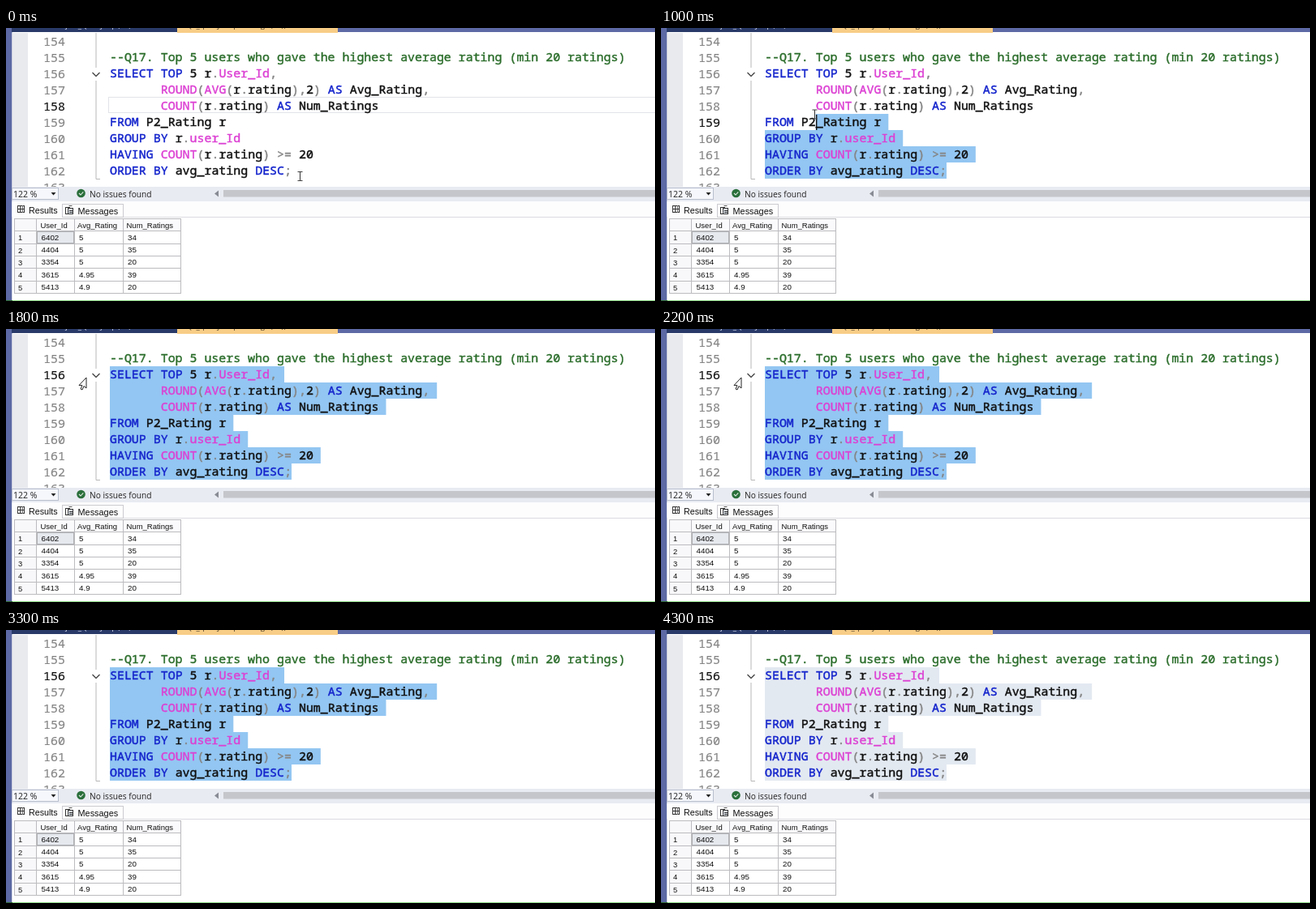
Recreate the animation shown at these times as an HTML page with a canvas. Size 800 by 337 pixels, loop 4.4 s.

```html
<!DOCTYPE html>
<html lang="en">
<head>
<meta charset="utf-8">
<title>SQL query run</title>
<style>
html, body { margin: 0; width: 100%; height: 100%; overflow: hidden; background: #fff; }
canvas { display: block; }
</style>
</head>
<body>
<canvas id="stage" width="800" height="337"></canvas>
<script>
const ctx = document.getElementById('stage').getContext('2d');
const LOOP = 4400, STEP = 100;
const LEFT = 128, CHAR = 8.96, ROW = 20, TOP = 46;
const MONO = '500 14.93px "Noto Sans Mono", monospace';
const ARIAL = '"Liberation Sans", sans-serif';
const UI = '"Open Sans", sans-serif';

const comment = '--Q17. Top 5 users who gave the highest average rating (min 20 ratings)';
const query = [
  'SELECT TOP 5 r.User_Id,',
  '       ROUND(AVG(r.rating),2) AS Avg_Rating,',
  '       COUNT(r.rating) AS Num_Ratings',
  'FROM P2_Rating r',
  'GROUP BY r.user_Id',
  'HAVING COUNT(r.rating) >= 20',
  'ORDER BY avg_rating DESC;'
];
const results = [
  [6402, 5, 34], [4404, 5, 35], [3354, 5, 20], [3615, 4.95, 39], [5413, 4.9, 20]
];

function rect(x, y, w, h, color) {
  ctx.fillStyle = color;
  ctx.fillRect(x, y, w, h);
}

function box(x, y, w, h, fill, stroke) {
  rect(x, y, w, h, fill);
  ctx.strokeStyle = stroke;
  ctx.lineWidth = 1;
  ctx.strokeRect(x + .5, y + .5, w - 1, h - 1);
}

function text(str, x, y, font, color) {
  ctx.font = font;
  ctx.fillStyle = color;
  ctx.fillText(str, x, y);
}

// Code is a little heavier than the font's regular weight.
function codeText(str, x, y, color, weight = .45) {
  text(str, x, y, MONO, color);
  ctx.strokeStyle = color;
  ctx.lineWidth = weight;
  ctx.lineJoin = 'round';
  ctx.strokeText(str, x, y);
}

function line(points, color, width = 1) {
  ctx.beginPath();
  points.forEach(([x, y]) => ctx.lineTo(x, y));
  ctx.strokeStyle = color;
  ctx.lineWidth = width;
  ctx.stroke();
}

function polygon(points, fill, stroke) {
  ctx.beginPath();
  points.forEach(([x, y]) => ctx.lineTo(x, y));
  ctx.closePath();
  ctx.fillStyle = fill;
  ctx.fill();
  if (stroke) {
    ctx.strokeStyle = stroke;
    ctx.lineWidth = 1;
    ctx.stroke();
  }
}

function tokenColor(token) {
  if (/^(SELECT|TOP|AS|FROM|GROUP|BY|HAVING|ORDER|DESC)$/.test(token)) return '#1525cc';
  if (/^(ROUND|AVG|COUNT|user_id)$/i.test(token)) return '#dc40d3';
  return /\w/.test(token) ? '#111' : '#858585';
}

function codeLine(str, y) {
  for (const { 0: token, index } of str.matchAll(/\w+|[^\w\s]+/g))
    codeText(token, LEFT + index * CHAR, y, tokenColor(token));
}

// Pointer position: settle, drag up to the first line, rest in the margin, leave.
const path = [
  [0, 362, 183], [100, 362, 183], [300, 354, 183], [700, 354, 183],
  [1200, 99, 65], [1600, 99, 65], [1800, 94, 67], [2900, 94, 67], [3200, 80, 360]
];

function pointerAt(t) {
  const next = path.findIndex(p => p[0] > t);
  if (next < 0) return path[path.length - 1].slice(1);
  const [t0, x0, y0] = path[next - 1], [t1, x1, y1] = path[next];
  const k = (t - t0) / (t1 - t0), ease = k * k * (3 - 2 * k);
  return [x0 + (x1 - x0) * ease, y0 + (y1 - y0) * ease];
}

function caretAt(t, [x, y]) {
  if (t < 400) return { row: 2, col: query[2].length };
  if (t >= 1200) return { row: 0, col: 0 };
  const row = Math.max(0, Math.min(6, Math.floor((y - TOP) / ROW)));
  const col = Math.max(0, Math.min(query[row].length, Math.round((x - LEFT) / CHAR)));
  return { row, col };
}

function drawTabs(running) {
  rect(0, 0, 800, 337, '#fff');
  rect(0, 0, 7.5, 337, '#5c69a4');
  rect(7, 0, 793, 5, '#5c69a4');
  rect(7, 0, 204, 5, '#293a69');
  rect(211, 0, 198, 6, '#f8cd86');
  text('Project_Query.sql (68)', 58, 0, '9.5px ' + UI, '#dfe4f2');
  text(running ? 'SQL_query1.sql - Executing...' : 'SQL_query1.sql - ratings (71))*',
    217, 0, '9.5px ' + UI, '#4a3d28');
}

function drawEditor(t, pointer) {
  const caret = caretAt(t, pointer);
  const selected = t >= 700;
  ctx.save();
  ctx.beginPath();
  ctx.rect(7, 6, 793, 190);
  ctx.clip();
  rect(7.5, 6, 19.5, 190, '#e8eaee');

  if (selected) {
    const color = t < 3800 ? '#93c6f2' : '#e3e9f1';
    query.forEach((str, row) => {
      if (row < caret.row) return;
      const from = row === caret.row ? caret.col : 0;
      const to = str.length + (row < 6 ? 1 : 0);
      rect(LEFT + from * CHAR, TOP + row * ROW, (to - from) * CHAR, ROW, color);
    });
  } else {
    ctx.strokeStyle = '#e2e3e9';
    ctx.lineWidth = 1;
    ctx.strokeRect(126.5, TOP + caret.row * ROW - .5, 690, 19);
  }

  for (let i = 0; i < 10; i++)
    codeText(154 + i, 46, 22.3 + i * ROW, i === caret.row + 2 ? '#111' : '#858585', .2);
  line([[111, 6], [111, 186.5], [116, 186.5]], '#b8b8b8');
  rect(105, 49, 13, 16, '#fff');
  line([[106.5, 55], [111, 59.5], [115.5, 55]], '#444', 1.3);

  codeText(comment, LEFT, 40.6, '#2b6d2b');
  query.forEach((str, row) => codeLine(str, 60.6 + row * ROW));

  const blinkOn = (t >= 400 && t < 1700) || (t >= 2400 && t < 2900);
  if (blinkOn)
    rect(Math.round(LEFT + caret.col * CHAR), TOP + caret.row * ROW + 1, 1.4, 19, '#111');
  ctx.restore();
}

function drawStatus() {
  rect(7.5, 196, 793, 18, '#e9ebf2');
  box(7, 197, 58, 15, '#f5f7fc', '#b9bfce');
  text('122 %', 9, 208.5, '10.5px ' + UI, '#222');
  polygon([[55.5, 203], [61.5, 203], [58.5, 206.5]], '#222');
  ctx.beginPath();
  ctx.arc(92.5, 204, 5.3, 0, 7);
  ctx.fillStyle = '#2a6f3b';
  ctx.fill();
  line([[90, 204], [92, 206], [95.3, 202.3]], '#dfe9e0', 1.1);
  text('No issues found', 103, 208.5, '10.2px ' + UI, '#222');
  polygon([[257, 204.5], [262, 200.5], [262, 208.5]], '#888b93');
  rect(268, 200, 532, 8.5, '#c5c6cb');
}

function drawResultTabs(running) {
  rect(7.5, 214, 793, 123, running ? '#f9f9fe' : '#fff');
  rect(7.5, 214, 793, 19, '#fdfdfe');
  rect(7.5, 233, 793, 1, '#dcdce2');
  box(69, 217, 76, 17, '#fdfdfd', '#cbcbd0');
  rect(8, 215, 61, 19, '#fdfdfe');

  ctx.strokeStyle = '#333';
  ctx.lineWidth = 1;
  ctx.strokeRect(14.5, 219.5, 8, 8);
  line([[17.5, 219], [17.5, 228]], '#333');
  line([[20.5, 219], [20.5, 228]], '#777');
  line([[14, 223.5], [23, 223.5]], '#333');
  text('Results', 28, 228.5, '10.7px ' + ARIAL, '#111');

  box(73, 221, 6, 9, '#fff', '#333');
  box(76, 222, 7, 8, '#dfe5ef', '#333');
  line([[78, 225.5], [82, 225.5]], '#333');
  line([[78, 227.5], [82, 227.5]], '#333');
  line([[77.5, 219.5], [81.5, 219.5]], '#555');
  text('Messages', 88.5, 230, '10.9px ' + ARIAL, '#111');
}

function drawGrid() {
  const columns = [10, 37, 84, 144, 215];
  const rowY = i => 235 + i * 15.3;
  rect(10, 235, 205, 15, '#fafafc');
  rect(10, 235, 27, 92, '#f8f8fa');
  rect(38, 251, 46, 15, '#e6e9ee');
  columns.forEach(x => rect(x, 235, 1, 93, '#bcbcc0'));
  for (let i = 0; i <= 6; i++) rect(10, Math.round(rowY(i)), 206, 1, '#bcbcc0');

  ctx.setLineDash([1, 1]);
  ctx.strokeStyle = '#777';
  ctx.lineWidth = 1;
  ctx.strokeRect(38.5, 251.5, 45, 14);
  ctx.setLineDash([]);

  ['User_Id', 'Avg_Rating', 'Num_Ratings'].forEach((name, c) =>
    text(name, [42.5, 88, 148.5][c], 247, '9.5px ' + ARIAL, '#111'));
  results.forEach((values, r) => {
    const y = rowY(r + 1) + 11.5;
    text(r + 1, 15, y + .5, '9.4px ' + ARIAL, '#111');
    values.forEach((value, c) =>
      text(value, [43.5, 90, 150][c], y, '9.8px ' + ARIAL, '#111'));
  });
}

function drawPointer(t, [x, y]) {
  if (t >= 3200) return;
  if (t < 1700) {
    x = Math.round(x) + .5;
    line([[x - 3, y - 5.5], [x + 3, y - 5.5]], '#444');
    line([[x, y - 5.5], [x, y + 5.5]], '#333');
    line([[x - 3, y + 5.5], [x + 3, y + 5.5]], '#444');
  } else {
    polygon([[5, -7], [5, 6], [2, 3.5], [0, 8], [-2, 7], [0, 2.7], [-4, 2.5]]
      .map(([dx, dy]) => [x + dx, y + dy]), '#fff', '#222');
  }
}

function draw(now) {
  const t = Math.floor((now % LOOP) / STEP) * STEP;
  const running = t >= 2400 && t < 2800;
  const pointer = pointerAt(t);
  drawTabs(running);
  drawEditor(t, pointer);
  drawStatus();
  drawResultTabs(running);
  if (!running) drawGrid();
  rect(0, 336, 800, 1, '#8fdc86');
  rect(0, 336, 8, 1, '#2f6a35');
  drawPointer(t, pointer);
}

function tick() {
  draw(performance.now());
  requestAnimationFrame(tick);
}
tick();
</script>
</body>
</html>
```
